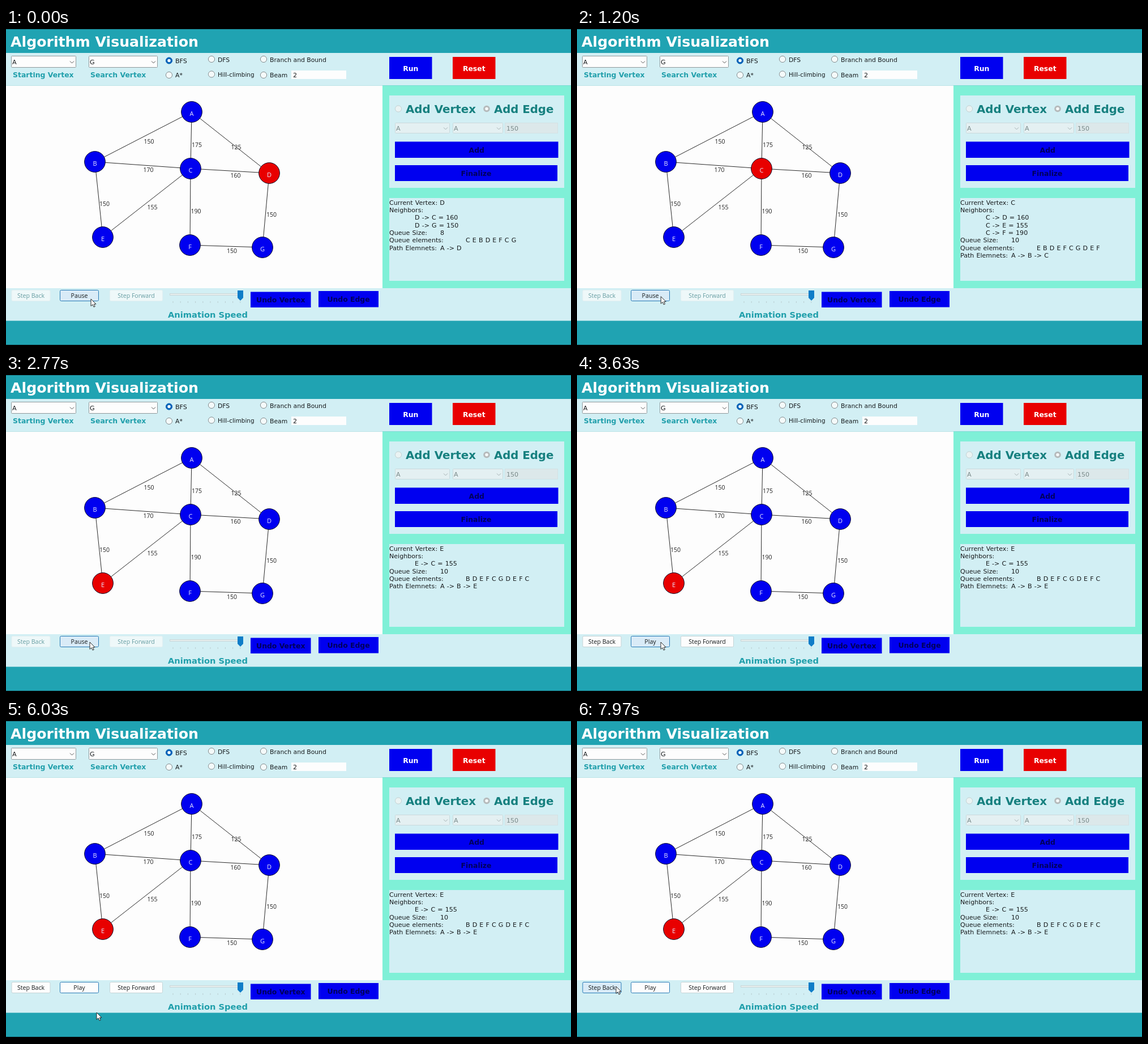
An HTML page that plays this animation: 998 px wide and 561 px high, repeating every 8 s.

```html
<!DOCTYPE html>
<html lang="en">
<head>
<meta charset="utf-8">
<title>Algorithm Visualization</title>
<style>
  html, body { margin: 0; width: 100%; height: 100%; overflow: hidden; background: #000; }
  svg { display: block; width: 998px; height: 561px; }
  text { font: 11.1px "DejaVu Sans", sans-serif; white-space: pre; }
  .bold { font-weight: bold; }
  .ui { font-family: "Open Sans", sans-serif; }
  .mid { text-anchor: middle; }
</style>
</head>
<body>
<svg id="stage" viewBox="0 0 998 561"></svg>
<script>
const stage = document.getElementById('stage');
const TEAL = '#20a3b2', PALE = '#d2eff4', BLUE = '#0000f0', RED = '#e80000', INK = '#161a1c';
const LABEL = '#209fab', HEADING = '#16807f', DIM = '#00005c', MUTED = '#788888';

function add(tag, attrs, parent = stage) {
  const el = document.createElementNS('http://www.w3.org/2000/svg', tag);
  for (const key in attrs) el.setAttribute(key, attrs[key]);
  return parent.appendChild(el);
}
const rect = (x, y, width, height, fill, more = {}) => add('rect', { x, y, width, height, fill, ...more });
const circle = (cx, cy, r, fill, more = {}) => add('circle', { cx, cy, r, fill, ...more });
const path = (d, stroke, more = {}) => add('path', { d, stroke, fill: 'none', ...more });

function label(str, x, y, fill = INK, size = 11.1, cls = '', parent = stage) {
  const el = add('text', { x, y, fill, class: cls }, parent);
  el.style.fontSize = size + 'px';
  el.textContent = str;
  return el;
}

function block(str, x, y, w, h, fill, color) {
  rect(x, y, w, h, fill);
  label(str, x + w / 2, y + h / 2 + 5, color, 12.4, 'bold mid');
}

function combo(str, x, y, w, h, enabled) {
  rect(x + .5, y + .5, w - 1, h - 1, enabled ? '#fdfdfd' : '#e4f0f2',
    { stroke: enabled ? '#8f999c' : '#cbd9dc', rx: 1 });
  label(str, x + 2, y + h / 2 + 4, enabled ? INK : MUTED);
  path(`M${x + w - 11} ${y + h / 2 - 1}l3.5 3.5 3.5 -3.5`, enabled ? '#555' : '#a5b0b2');
}

function radio(x, y, str, dy, size = 10.8, on = false) {
  circle(x, y, 5.6, on ? '#0062b8' : '#f4fafa', { stroke: on ? '#0062b8' : '#858d90' });
  if (on) circle(x, y, 2.7, '#fff');
  label(str, x + 11, y + dy, INK, size);
}

// Backdrop
rect(0, 2, 998, 557, TEAL);
rect(0, 44, 998, 57.5, PALE);
rect(0, 459, 998, 57.5, PALE);
rect(0, 101.5, 665, 357.5, '#fdfdfd');
rect(665, 101.5, 333, 357.5, '#7ff0d7');
rect(677, 119, 309, 163, PALE);
rect(677, 300, 309, 146, PALE);

// Header and search options
label('Algorithm Visualization', 8, 32.5, '#fff', 25.2, 'bold');
combo('A', 9, 49, 115, 21, true);
combo('G', 146, 49, 122, 21, true);
label('Starting Vertex', 12, 87, LABEL, 12.45, 'bold');
label('Search Vertex', 149, 87, LABEL, 12.45, 'bold');
radio(288, 57.5, 'BFS', 4.5, 11.1, true);
radio(288, 83, 'A*', 4);
radio(363, 55, 'DFS', 4.5);
radio(363, 81.5, 'Hill-climbing', 4, 10.4);
radio(455, 55, 'Branch and Bound', 4.5);
radio(455, 83, 'Beam', 4);
rect(504, 75, 97, 15, '#fdfdfd');
label('2', 507, 87);
block('Run', 677, 51, 75.5, 39, BLUE, '#fff');
block('Reset', 789, 51, 75.5, 39, RED, '#fff');

// Graph editor
circle(693, 142.5, 5.6, '#eaf3f3', { stroke: '#c3d0d2' });
circle(849, 142.5, 5.8, '#b5babb');
circle(849, 142.5, 2.8, '#f4f8f8');
label('Add Vertex', 706, 150, HEADING, 19.85, 'bold');
label('Add Edge', 862, 150, HEADING, 19.7, 'bold');
combo('A', 687, 167, 97, 19, false);
combo('A', 789, 167, 89, 19, false);
rect(881.5, 167.5, 93, 18, '#dce8ea', { stroke: '#d3e1e4' });
label('150', 884, 181, MUTED);
block('Add', 687, 200.5, 288.5, 28.5, BLUE, DIM);
block('Finalize', 687, 242, 287, 28, BLUE, DIM);

// Graph
const nodes = { A: [328, 148], B: [157, 236], C: [326, 248], D: [465, 256], E: [171, 369], F: [325, 383], G: [453, 387] };
const edges = { AB: 150, AC: 175, AD: 125, BC: 170, BE: 150, CD: 160, CE: 155, CF: 190, FG: 150, DG: 150 };
for (const pair in edges) {
  const [[x1, y1], [x2, y2]] = [...pair].map(name => nodes[name]);
  path(`M${x1} ${y1}L${x2} ${y2}`, '#2a2a2a');
  label(edges[pair], (x1 + x2) / 2 + 10, (y1 + y2) / 2 + 11.5, '#222', 10.5, 'ui mid');
}
const discs = {};
for (const name in nodes) {
  const [x, y] = nodes[name];
  discs[name] = circle(x, y, 18.4, BLUE, { stroke: '#10102c' });
  label(name, x, y + 7, '#e8e8ff', 11, 'ui mid');
}

// Playback controls
function button(str, x, w) {
  const box = rect(x + .5, 462.5, w - 1, 19, '#fdfdfd', { rx: 2 });
  const text = label(str, x + w / 2, 476, INK, 10.6, 'ui mid');
  return { box, text, x, w };
}
const back = button('Step Back', 9.5, 69);
const toggle = button('Pause', 95, 69);
const forward = button('Step Forward', 183, 94);

rect(289.5, 468.5, 124, 3, '#e6eeee', { stroke: '#c9d6d8' });
for (let i = 0; i < 10; i++) rect(294.5 + i * 13.2, 482, 1, 3, '#b9cdd0');
path('M409 463h10v13l-5 5 -5 -5z', 'none', { fill: '#0f7dc8' });
label('Animation Speed', 286, 511, LABEL, 14.65, 'bold');
block('Undo Vertex', 432, 465.5, 106.5, 27.5, BLUE, DIM);
block('Undo Edge', 552, 464, 106, 28.5, BLUE, DIM);

// Search log, one group per step
const steps = [
  { at: 0, node: 'D', next: 'CG', queue: 'CEBDEFCG', route: 'AD' },
  { at: 380, node: 'C', next: 'DEF', queue: 'EBDEFCGDEF', route: 'ABC' },
  { at: 2450, node: 'E', next: 'C', queue: 'BDEFCGDEFC', route: 'ABE' }
];
const PAUSED_AT = 2950, LOOP = 8000;
for (const step of steps) {
  const { node, next, queue, route } = step;
  const group = step.group = add('g', { style: 'word-spacing:.035em' });
  let y = 311.5;
  const row = (...parts) => {
    for (const [x, str] of parts) label(str, x, y, INK, 11.1, '', group);
    y += 13.35;
  };
  row([677, 'Current Vertex: ' + node]);
  row([677, 'Neighbors:']);
  for (const to of next) row([722, `${node} -> ${to} = ${edges[[node, to].sort().join('')]}`]);
  row([677, 'Queue Size:'], [767, queue.length]);
  row([677, 'Queue elements:'], [812, [...queue].join(' ')]);
  row([677, 'Path Elemnets:'], [767, [...route].join(' -> ')]);
}

// Pointer: time, x, y
const track = [
  [0, 150, 478], [670, 149, 477], [1400, 148, 473], [3700, 148, 473], [4120, 164, 527],
  [4700, 164, 527], [5050, 162, 518], [5500, 160, 516], [6850, 160, 516], [7450, 72, 473],
  [7700, 69, 470], [LOOP, 69, 470]
];
const pointer = path('M0 0V12.5L3 9.8 5 14.2 7.2 13.3 5.2 9.1H9Z', '#111', { fill: '#fff', 'stroke-width': .9 });

function pointerAt(t) {
  const i = track.findIndex(p => p[0] > t);
  const [t0, x0, y0] = track[i - 1], [t1, x1, y1] = track[i];
  const u = (t - t0) / (t1 - t0), k = u * u * (3 - 2 * u);
  return [x0 + (x1 - x0) * k, y0 + (y1 - y0) * k];
}

function paint({ box, text, x, w }, [px, py], enabled, focused) {
  const hover = enabled && px >= x && px <= x + w && py >= 462 && py <= 482;
  box.setAttribute('fill', !enabled ? '#eef8f9' : hover ? '#d9ebf7' : '#fdfdfd');
  box.setAttribute('stroke', !enabled ? '#e2eff1' : hover || focused ? '#2679b5' : '#c5d3d6');
  text.setAttribute('fill', enabled ? INK : '#669da2');
}

function draw() {
  const t = performance.now() % LOOP;
  const current = steps.filter(s => s.at <= t).pop();
  for (const s of steps) s.group.style.display = s === current ? '' : 'none';
  for (const name in discs) discs[name].setAttribute('fill', name === current.node ? RED : BLUE);

  const spot = pointerAt(t), paused = t >= PAUSED_AT;
  pointer.setAttribute('transform', `translate(${spot})`);
  toggle.text.textContent = paused ? 'Play' : 'Pause';
  paint(back, spot, paused);
  paint(toggle, spot, true, true);
  paint(forward, spot, paused);
  requestAnimationFrame(draw);
}
draw();
</script>
</body>
</html>
```
